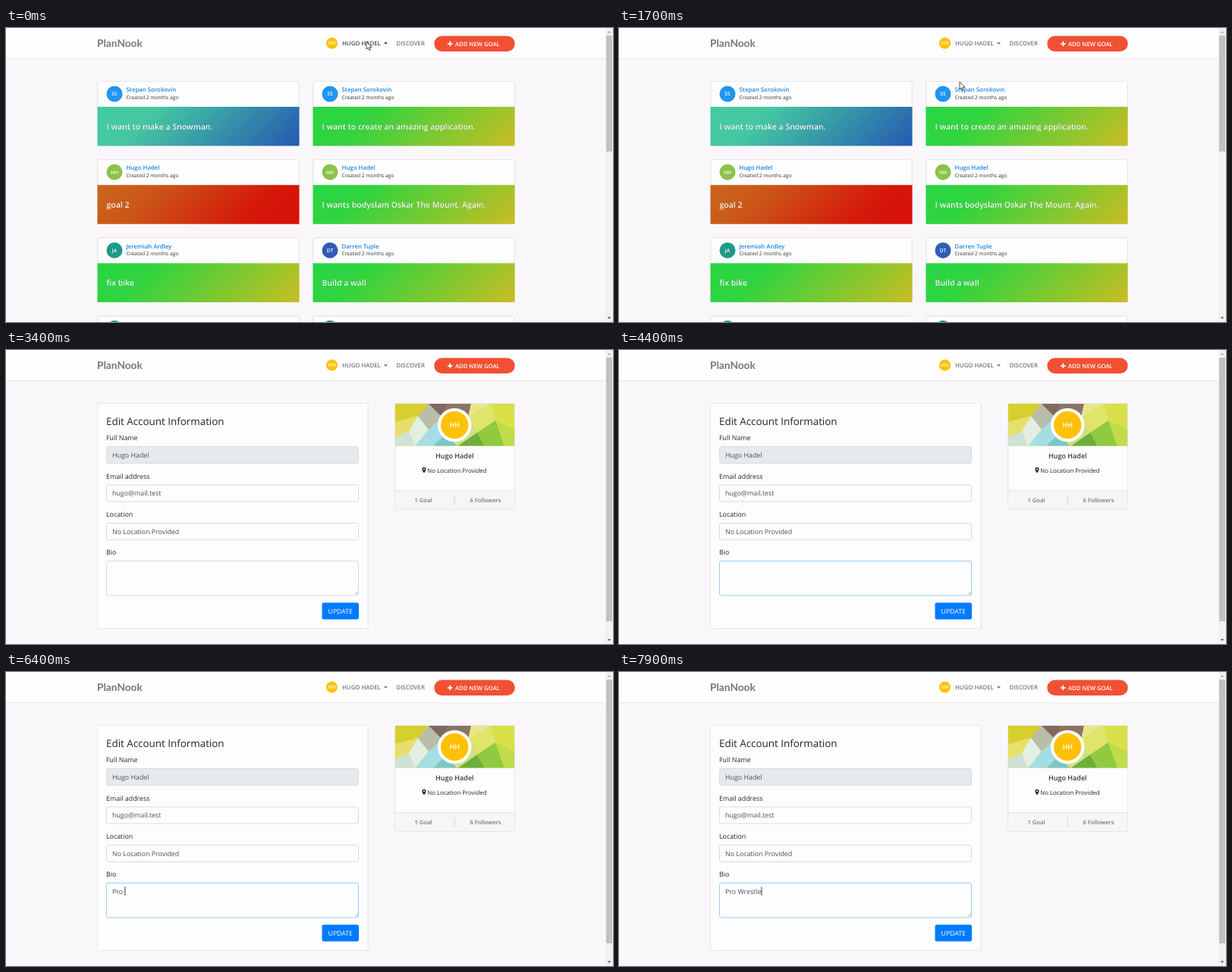
These frames come from a looping animation (800 px wide and 388 px high, 8 s). An HTML page:

```html
<!DOCTYPE html>
<html lang="en">
<head>
<meta charset="utf-8">
<title>PlanNook</title>
<style>
html, body { margin: 0; width: 100%; height: 100%; overflow: hidden; background: #f9f7fa; }
svg { display: block; width: 800px; height: 388px; }
text { font-family: "Open Sans", "Noto Sans", sans-serif; text-rendering: geometricPrecision; white-space: pre; }
.semi { font-weight: 600; }
.mid { text-anchor: middle; }
.goal { font-weight: 600; filter: drop-shadow(.5px .6px .4px rgba(0, 0, 0, .45)); }
.logo { font-family: Lato, sans-serif; font-weight: 700; }
.card { filter: drop-shadow(0 .6px .7px rgba(0, 0, 0, .12)); }
</style>
</head>
<body>
<svg id="stage" viewBox="0 0 800 388"></svg>
<script>
const PAPER = '#fefdfe', EDGE = '#e8e7ea', FIELD_EDGE = '#d8dbdf';

const rect = (x, y, w, h, fill, more = '') =>
  `<rect x="${x}" y="${y}" width="${w}" height="${h}" fill="${fill}" ${more}/>`;
const text = (x, y, size, fill, str, cls = '') =>
  `<text x="${x}" y="${y}" font-size="${size}" fill="${fill}" class="${cls}">${str}</text>`;
const path = (d, fill, more = '') => `<path d="${d}" fill="${fill}" ${more}/>`;
const circle = (x, y, r, fill) => `<circle cx="${x}" cy="${y}" r="${r}" fill="${fill}"/>`;
const avatar = (x, y, r, fill, initials, size) =>
  circle(x, y, r, fill) + text(x, y + size * .36, size, '#fff', initials, 'semi mid');
const card = (x, y, w, h) => rect(x, y, w, h, PAPER, `rx="2" stroke="${EDGE}" class="card"`);

// 135 degree gradient across a 266 x 52 banner
const gradient = (id, ...stops) =>
  `<linearGradient id="${id}" gradientUnits="userSpaceOnUse" x1="53.5" y1="-53.5" x2="212.5" y2="105.5">` +
  stops.map(([at, color]) => `<stop offset="${at}" stop-color="${color}"/>`).join('') +
  '</linearGradient>';

function goalCard(x, y, name, initials, color, goal, fill) {
  return `<g transform="translate(${x} ${y})">` +
    card(.5, .5, 265, 84.5) +
    avatar(22.5, 17, 10.5, color, initials, 6.6) +
    text(38, 14.2, 7.83, '#1b87e5', name, 'semi') +
    text(38, 24, 6.7, '#333', 'Created 2 months ago') +
    `<g transform="translate(0 34)">${rect(0, 0, 266, 51.5, `url(#${fill})`)}</g>` +
    text(12, 64, 10.5, '#fff', goal, 'goal') + '</g>';
}

const USER = 'Hugo Hadel', RIVAL = 'Oskar The Mount';
const GOALS = [
  ['Stepan Sorokovin', 'SS', '#2095f2', 'I want to make a Snowman.', 'sea'],
  ['Stepan Sorokovin', 'SS', '#2095f2', 'I want to create an amazing application.', 'lime'],
  [USER, 'HH', '#8bc34a', 'goal 2', 'fire'],
  [USER, 'HH', '#8bc34a', `I wants bodyslam ${RIVAL}. Again.`, 'lime'],
  ['Jeremiah Ardley', 'JA', '#1d9a8a', 'fix bike', 'lime'],
  ['Darren Tuple', 'DT', '#2f5db5', 'Build a wall', 'lime'],
  ['', '', '#1d9a8a', '', 'lime'],
  ['', '', '#1b86a0', '', 'lime']
];
const feed = GOALS.map((g, i) => goalCard(i % 2 ? 404.5 : 120.5, 70 + 103.2 * (i >> 1), ...g)).join('');

const field = (y, h, label, value, fill = PAPER, more = '') =>
  text(132, y - 8, 8.85, '#212529', label) +
  rect(132.5, y + .5, 332, h, fill, `rx="2.3" stroke="${FIELD_EDGE}" ${more}`) +
  text(140, y + 14.7, 8.85, '#495057', value);

const form =
  card(120.5, 70.5, 356.5, 297) +
  text(132, 99, 13.4, '#212529', 'Edit Account Information') +
  field(127, 22, 'Full Name', USER, '#e7eaec') +
  field(177.5, 22, 'Email address', 'hugo@mail.test') +
  field(228, 22, 'Location', 'No Location Provided') +
  field(278, 45.5, 'Bio', '', PAPER, 'id="area"') +
  path('M460 322.5l4-4M462.5 322.5l1.5-1.5', 'none', 'stroke="#888" stroke-width=".7"') +
  text(140, 293, 8.85, '#495057', '', 'bio') + rect(140, 283.5, 1, 11.5, '#333', 'id="caret"') +
  rect(416.5, 333.5, 48.5, 22, '#007bff', 'rx="2.3"') +
  text(440.7, 348, 8.7, '#fff', 'UPDATE', 'mid');

const facets = [
  ['M0 0H157V56H0z', '#d8e04a'],
  ['M0 0H44L30 16 0 24z', '#d6cf2e'],
  ['M0 24L30 16 18 36 0 44z', '#e6e06a'],
  ['M0 44L18 36 26 56H0z', '#cfe2d6'],
  ['M18 36L30 16 44 34 26 56z', '#e4efe4'],
  ['M30 16L44 0 62 18 44 34z', '#b9bdaa'],
  ['M44 0H70L62 18z', '#7d6a60'],
  ['M44 34L62 18 66 40 50 56H26z', '#a5dde6'],
  ['M66 40L50 56H82z', '#7cc6c8'],
  ['M70 0H100L96 18H62z', '#8a7468'],
  ['M100 0H126L96 18z', '#e9e58a'],
  ['M96 18L126 0 132 22 108 38z', '#dfe46a'],
  ['M96 18L108 38 82 56 66 40z', '#cfe08a'],
  ['M82 56L108 38 118 56z', '#6fae3c'],
  ['M108 38L132 22 144 56H118z', '#8fca40'],
  ['M132 22L157 34V56H144z', '#c0dc48']
];
const profile =
  card(513, 70.5, 157.5, 139.5) +
  `<svg x="513" y="71" width="157.5" height="55.5">${facets.map(f => path(...f)).join('')}</svg>` +
  circle(591.2, 99, 22.3, '#fff') + avatar(591.2, 99, 18.2, '#ffc107', 'HH', 9) +
  text(591.3, 143, 9, '#343a40', USER, 'semi mid') +
  path('M551 162.5C549.6 160 548.4 159 548.4 157.4a2.6 2.6 0 0 1 5.2 0C553.6 159 552.4 160 551 162.5zM551 156.2a1.1 1.1 0 1 0 .01 0z',
    '#212529', 'fill-rule="evenodd"') +
  text(555.3, 161.6, 7.85, '#212529', 'No Location Provided') +
  rect(513.5, 185, 156.5, 24.5, '#f6f6f7') + rect(513, 185, 157.5, 1, '#e4e4e6') +
  rect(590.7, 192, 1, 12, '#d2d2d4') +
  text(550, 200.8, 7.55, '#777', '1 Goal', 'semi mid') +
  text(632, 200.8, 7.55, '#777', '6 Followers', 'semi mid');

const header =
  rect(0, 0, 790, 40, '#fefefe') + rect(0, 40, 790, 1, '#e6e6e8') +
  text(120, 25.2, 13.7, '#777', 'PlanNook', 'logo') +
  avatar(429.5, 20, 7.6, '#ffc107', 'HH', 6.3) +
  `<g id="menu" fill="#777"><text x="443" y="23.3" font-size="7.8" class="semi">${USER.toUpperCase()}</text>` +
  '<path d="M498 19h5l-2.5 2.8z"/></g>' +
  text(514.5, 23.3, 7.8, '#777', 'DISCOVER', 'semi') +
  rect(564.3, 10.5, 106.4, 20.5, '#f25033', 'rx="10.25"') +
  path('M582 20.8h6.6M585.3 17.5v6.6', 'none', 'stroke="#fff" stroke-width="1.8"') +
  text(592, 23.7, 7.7, '#fff', 'ADD NEW GOAL', 'semi');

const scrollbar =
  rect(790, 0, 10, 388, '#f1f1f1') + rect(791, 10, 8, 153, '#c1c1c1', 'id="thumb"') +
  path('M792.8 6.5h4.4l-2.2-2.6z', '#a3a3a3') + path('M792.8 381.5h4.4l-2.2 2.6z', '#505050');

const $ = q => document.querySelector(q);
$('#stage').innerHTML =
  '<defs>' +
  gradient('sea', [0, '#43cba2'], [.25, '#45c8a2'], [1, '#2559b2']) +
  gradient('lime', [0, '#28d545'], [.25, '#30d43f'], [1, '#cabd22']) +
  gradient('fire', [0, '#cb661c'], [.25, '#cb5718'], [.75, '#d5180a'], [1, '#d80f08']) +
  '</defs>' + rect(0, 0, 800, 388, '#f9f7fa') +
  `<g id="feed">${feed}</g><g id="account">${form}${profile}</g>` + header + scrollbar +
  path('M0 0v10l2.3-2.1 1.6 3.6 1.6-.7-1.6-3.5h3.1z', '#fff', 'id="cursor" stroke="#222" stroke-width=".8"');

const BIO = 'Pro Wrestle';
const KEYS = [5600, 5700, 5900, 6400, 6800, 7100, 7200, 7400, 7700, 7800, 7900];
const MOVES = [[600, 1400, 475, 18, 449, 71], [2500, 3400, 449, 71, 300, 300]];
const within = (t, a, b) => t >= a && t < b;
const show = (q, on) => $(q).setAttribute('visibility', on ? 'visible' : 'hidden');

function draw(now) {
  const t = Math.floor(now % 8000 / 100) * 100;
  const edit = t >= 2200;
  show('#feed', !edit);
  show('#account', edit);
  $('#thumb').setAttribute('height', edit ? 348 : 153);

  const [start, end, x0, y0, x1, y1] = MOVES[+edit];
  const p = Math.min(1, Math.max(0, (t - start) / (end - start)));
  const k = p * p * (3 - 2 * p);
  const x = x0 + (x1 - x0) * k, y = y0 + (y1 - y0) * k;
  $('#cursor').setAttribute('transform', `translate(${x} ${y})`);
  show('#cursor', t < 3400);
  $('#menu').setAttribute('fill', y < 30 ? '#484848' : '#777');

  const bio = $('.bio');
  bio.textContent = BIO.slice(0, KEYS.filter(key => key <= t).length);
  $('#caret').setAttribute('x', 140 + (bio.textContent ? bio.getComputedTextLength() : 0));
  show('#caret', within(t, 3900, 4400) || within(t, 4900, 5100) || t >= 5700);
  $('#area').setAttribute('stroke', t >= 3900 ? '#98cdf5' : FIELD_EDGE);
}

const begin = performance.now();
function tick() {
  draw(performance.now() - begin);
  requestAnimationFrame(tick);
}
tick();
</script>
</body>
</html>
```
